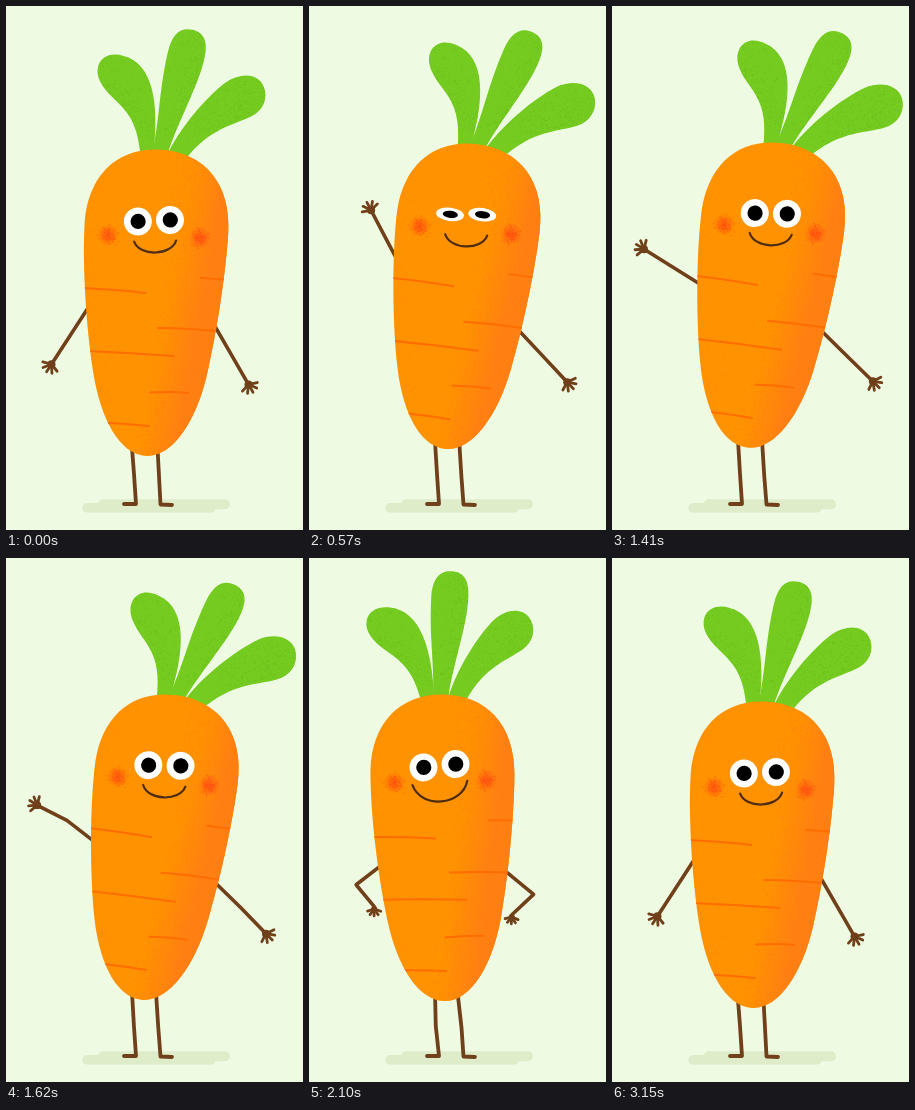
These frames come from a looping animation (297 px wide and 524 px high, 3.33 s). An HTML page with a canvas:

```html
<!DOCTYPE html>
<html lang="en">
<head>
<meta charset="utf-8">
<title>Waving carrot</title>
<style>
  html, body { margin: 0; width: 100%; height: 100%; overflow: hidden; background: #eefbe2; }
  canvas { display: block; width: 297px; height: 524px; }
</style>
</head>
<body>
<canvas id="stage"></canvas>
<script>
const W = 297, H = 524, LOOP = 3330, STEP = 30;
const canvas = document.getElementById('stage');
const ctx = canvas.getContext('2d');
const dpr = window.devicePixelRatio || 1;
canvas.width = W * dpr;
canvas.height = H * dpr;

const BROWN = '#70401a', ORANGE = '#ff9200', SHADE = '#ff7f13', STRIPE = '#ff6c00';
const GREEN = '#75cb20', DARK_GREEN = '#62b714';

// body: x, y, tilt, leaf swing, smile, knee bend
// arms: shoulder x, y, upper angle, lower angle, lower length, wave amount
const poses = {
  rest: { body: [143, 420, 3.6, 11.5, 0, 0], left: [88.5, 292, 123, 123, 34, 0], right: [203, 310, 60, 60, 34] },
  wave: { body: [140, 412, 7.5, 23, 0, 0], left: [99, 274, 232, 232, 34, 1], right: [204.5, 320, 44.5, 44.5, 34] },
  turn: { body: [138, 415, 1.9, 11.6, 1, 1], left: [82, 297, 144, 92, 22, 0], right: [196.5, 315, 41, 118, 24] },
  hips: { body: [137, 412, 0, 0, 1, 0], left: [80, 302, 142, 40, 32, 0], right: [191, 308, 39, 141, 33] }
};

// The waving arm rises and falls a little ahead of the body.
const timeline = lead => [
  [180, 'rest'], [700 - lead, 'wave'], [1600 - lead, 'wave'], [1830, 'turn'],
  [2280, 'hips'], [2670, 'hips'], [3150, 'rest']
];

// Monotone cubic interpolation: smooth, no overshoot, rests at extremes.
function poseAt(part, t, lead = 0) {
  const keys = timeline(lead), last = keys.length - 1;
  const value = (k, c) => poses[keys[k][1]][part][c];
  t = Math.min(Math.max(t, keys[0][0]), keys[last][0]);
  let i = 0;
  while (i < last - 1 && t >= keys[i + 1][0]) i++;
  const span = keys[i + 1][0] - keys[i][0], u = (t - keys[i][0]) / span, w = 1 - u;
  const secant = (k, c) => (value(k + 1, c) - value(k, c)) / (keys[k + 1][0] - keys[k][0]);
  const slope = (k, c) => {
    if (k === 0 || k === last) return 0;
    const p = secant(k - 1, c), q = secant(k, c);
    return p * q <= 0 ? 0 : 2 * p * q / (p + q);
  };
  return poses.rest[part].map((_, c) =>
    value(i, c) * (1 + 2 * u) * w * w + value(i + 1, c) * u * u * (3 - 2 * u)
    + span * u * w * (w * slope(i, c) - u * slope(i + 1, c)));
}

function ease(u) {
  u = Math.min(Math.max(u, 0), 1);
  return u * u * (3 - 2 * u);
}

function leftArmAt(t) {
  const [x, y, upper, lower, length, wave] = poseAt('left', t, 100);
  const swing = wave * 20 * Math.cos((t - 645) / 510 * Math.PI * 2);
  const sink = wave * 11 * ease((t - 900) / 510);
  return [x, y + sink, upper + swing, lower + swing, length];
}

const eyeOpening = t =>
  Math.min(...[610, 2470].map(mid => 0.1 + 0.9 * ease(Math.abs(t - mid) / 90)));

function randomizer(seed) {
  return () => {
    seed = (seed * 1664525 + 1013904223) >>> 0;
    return seed / 4294967296;
  };
}

// Speckles in a box, kept with the given chance at each point.
function grain(seed, count, x, y, w, h, chance) {
  const rnd = randomizer(seed), path = new Path2D();
  for (let i = 0; i < count; i++) {
    const px = x + rnd() * w, py = y + rnd() * h;
    if (rnd() < chance(px, py)) path.rect(px, py, 1, 1);
  }
  return path;
}

const bodyShape = new Path2D('M132 135.5C175 135.5 204 165 204 215C204 250 200 305 192 355' +
  'C184 405 162 442 136 442C109 442 88 407 78 362C67 312 60 250 60 212C61 165 88 135.5 132 135.5Z');
const stripes = new Path2D('M62 278.5Q95 278 125 279.5M70 341Q115 340 157 340.5M179 261L206 261' +
  'M140 313.5Q170 312 203 313M136 378.5Q155 376 174 376.5M92 411.5Q115 411 137 412');

const bump = (x, center, width) => Math.exp(-(((x - center) / width) ** 2));
const shadeEdge = y => 168 - Math.max(0, y - 300) * 0.13;
const leftEdge = y => 62 + Math.max(0, y - 230) * 0.16;
const shadeGrain = grain(7, 9000, 120, 135, 80, 308, (x, y) => 0.4 * bump(x, shadeEdge(y) - 6, 17));
const lightGrain = grain(19, 5000, 150, 135, 50, 308, (x, y) => 0.22 * bump(x, shadeEdge(y) + 5, 11));
const leftGrain = grain(31, 3500, 60, 150, 60, 290, (x, y) => 0.3 * bump(x, leftEdge(y), 18));

function makeLeaf(outline, dots, follow, stretch) {
  return { shape: new Path2D(outline), dots, follow, stretch };
}
const leaves = [
  makeLeaf('M109 140C100 112 88 104 74 95C58 85 51 76 52 65C54 54 64 50 75 51C106 53 119 92 123 140L122 150L112 150Z',
    grain(3, 1100, 50, 48, 75, 80, (x, y) => 0.15 + 0.5 * bump(y - x * 0.55, 52, 14)), 0.97, 0),
  makeLeaf('M122 140C121 100 115 80 115 40C115 20 122 12 134 12C147 12 153 21 152 42C151 70 139 110 137 140L134 150L125 150Z',
    grain(5, 1000, 114, 11, 40, 110, x => 0.12 + 0.5 * bump(x, 148, 12)), 1.1, 0),
  makeLeaf('M136 142C143 112 162 78 178 60C190 48 205 46 213 55C220 63 220 75 212 84C198 98 172 103 154 142L148 150L138 150Z',
    grain(9, 1200, 140, 46, 80, 75, (x, y) => 0.12 + 0.45 * bump(x + y * 0.6, 246, 22)), 1, 0.0036)
];

const cheeks = [[84, 224], [176, 221]].map(([x, y], i) => ({
  x, y,
  dots: grain(41 + i, 420, x - 12, y - 12, 24, 24, (px, py) => 0.6 * bump(Math.hypot(px - x, py - y), 0, 7))
}));

const rad = deg => deg * Math.PI / 180;

function isolate(draw) {
  ctx.save();
  draw();
  ctx.restore();
}

function line(points, width, color) {
  ctx.beginPath();
  points.forEach(([x, y]) => ctx.lineTo(x, y));
  ctx.lineWidth = width;
  ctx.strokeStyle = color;
  ctx.stroke();
}

function ellipse(x, y, rx, ry, color) {
  ctx.beginPath();
  ctx.ellipse(x, y, rx, ry, 0, 0, Math.PI * 2);
  ctx.fillStyle = color;
  ctx.fill();
}

function speckle(path, color, alpha) {
  ctx.globalAlpha = alpha;
  ctx.fillStyle = color;
  ctx.fill(path);
  ctx.globalAlpha = 1;
}

function drawShadow() {
  line([[97, 498.3], [219, 498.3]], 10, '#deecca');
  line([[81, 501.8], [205, 501.8]], 9.5, '#deecca');
}

function drawLegs(x, y, knee) {
  const hip = 150 + (x - 140) * 0.5;
  line([[126, y + 22], [128 - 3.5 * knee, 468], [130, 498], [118, 498]], 3.8, BROWN);
  line([[hip, y + 22], [(hip + 154.5) / 2 + 2.8 * knee, 470], [154.5, 498.5], [166, 499]], 3.8, BROWN);
}

function drawArm([x, y, upper, lower, length]) {
  const reach = ([px, py], deg, r) => [px + Math.cos(rad(deg)) * r, py + Math.sin(rad(deg)) * r];
  const shoulder = [x, y];
  const elbow = reach(shoulder, upper, 42);
  const wrist = reach(elbow, lower, length);
  line([shoulder, elbow, wrist], 3.6, BROWN);
  const bend = upper - lower;
  const aim = lower + 0.44 * bend;
  const size = 1 - 0.0025 * Math.abs(bend);
  const palm = reach(wrist, aim, 3 * size);
  ellipse(...palm, 4 * size, 4 * size, BROWN);
  for (let finger = -2; finger <= 2; finger++)
    line([palm, reach(palm, aim + finger * 36, 9 * size)], 2.8, BROWN);
}

function drawLeaves(swing) {
  for (const leaf of leaves) isolate(() => {
    const scale = 1 + leaf.stretch * swing;
    ctx.rotate(rad(swing * leaf.follow));
    ctx.scale(scale, scale);
    ctx.translate(-132, -137);
    ctx.fillStyle = GREEN;
    ctx.fill(leaf.shape);
    ctx.clip(leaf.shape);
    speckle(leaf.dots, DARK_GREEN, 0.55);
  });
}

function drawBody() {
  ctx.fillStyle = ORANGE;
  ctx.fill(bodyShape);
  isolate(() => {
    ctx.clip(bodyShape);
    const shade = ctx.createLinearGradient(148, 290, 182, 294);
    shade.addColorStop(0, 'rgba(255,127,19,0)');
    shade.addColorStop(1, SHADE);
    ctx.fillStyle = shade;
    ctx.fillRect(55, 130, 155, 320);
    speckle(shadeGrain, SHADE, 0.7);
    speckle(lightGrain, ORANGE, 0.6);
    speckle(leftGrain, SHADE, 0.45);
    ctx.lineWidth = 2;
    ctx.strokeStyle = STRIPE;
    ctx.stroke(stripes);
  });
}

function drawFace(smile, open) {
  for (const { x, y, dots } of cheeks) {
    const glow = ctx.createRadialGradient(x, y, 0, x, y, 11);
    glow.addColorStop(0, 'rgba(255,72,16,.75)');
    glow.addColorStop(1, 'rgba(255,72,16,0)');
    ellipse(x, y, 11, 11, glow);
    speckle(dots, '#ff4310', 0.6);
  }
  for (const [x, y] of [[113, 208.5], [145, 205]]) {
    ellipse(x, y, 14, 14 * open, '#fff');
    ellipse(x + 0.3, y, 7.6, 7.6 * open, '#000');
  }
  isolate(() => {
    const half = 21 + 6.5 * smile, dip = (11.5 + 7 * smile) * 4 / 3;
    ctx.translate(131.5 - 2 * smile, 227 - 3 * smile);
    ctx.rotate(rad(-5));
    ctx.beginPath();
    ctx.moveTo(-half, 0);
    ctx.bezierCurveTo(-half * 0.75, dip, half * 0.75, dip, half, 0);
    ctx.lineWidth = 2.2;
    ctx.strokeStyle = '#4c2c12';
    ctx.stroke();
  });
}

function render(t) {
  const [x, y, tilt, swing, smile, knee] = poseAt('body', t);
  ctx.setTransform(dpr, 0, 0, dpr, 0, 0);
  ctx.lineCap = ctx.lineJoin = 'round';
  ctx.fillStyle = '#eefbe2';
  ctx.fillRect(0, 0, W, H);
  drawShadow();
  drawLegs(x, y, knee);
  drawArm(leftArmAt(t));
  drawArm(poseAt('right', t));
  ctx.translate(x, y);
  ctx.rotate(rad(tilt));
  ctx.translate(-137, -412);
  isolate(() => {
    // Leaf swing is measured against the stage, so undo the body tilt.
    ctx.translate(132 + swing * 0.15, 137);
    ctx.rotate(rad(-tilt));
    drawLeaves(swing);
  });
  drawBody();
  drawFace(smile, eyeOpening(t));
}

const start = performance.now();
function tick() {
  const t = (performance.now() - start) % LOOP;
  render(Math.floor(t / STEP) * STEP);
  requestAnimationFrame(tick);
}
tick();
</script>
</body>
</html>
```
